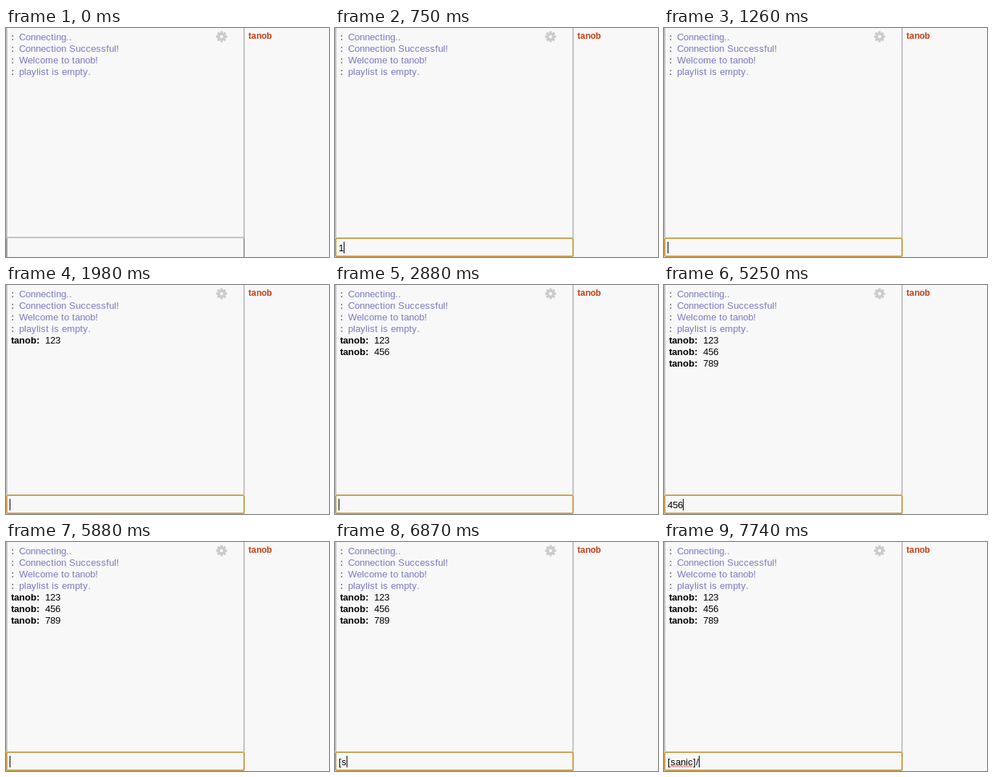
Write an HTML page with a canvas that moves like this. It is 445 px wide and 317 px high and loops after 8 s.

```html
<!DOCTYPE html>
<html lang="en">
<head>
<meta charset="utf-8">
<title>Chat input history</title>
<style>
  html, body { margin: 0; width: 100%; height: 100%; overflow: hidden; background: #f8f8f8; }
  canvas { display: block; }
</style>
</head>
<body>
<canvas id="stage" width="445" height="317"></canvas>
<script>
const ctx = document.getElementById('stage').getContext('2d');
const LOOP = 8000;
const BG = '#f8f8f8';
const USER = 'tanob';
const FACE = '"Liberation Sans", Arial, sans-serif';
const REGULAR = '13px ' + FACE;
const BOLD = 'bold 13px ' + FACE;
const LINE = 16;

const notices = ['Connecting..', 'Connection Successful!', `Welcome to ${USER}!`, 'playlist is empty.'];
const messages = [[1440, '123'], [2160, '456'], [3060, '789']];

const FOCUS_AT = 420;
const SQUIGGLE_AT = 7530;

// Contents of the input box from each moment on
const entries = [
  [0, ''],
  [750, '1'], [810, '12'], [870, '123'], [1260, ''],
  [1560, '4'], [1620, '45'], [1740, '456'], [1980, ''],
  [2220, '7'], [2400, '78'], [2610, '789'], [2880, ''],
  [4410, '789'], [4590, '456'], [4770, '123'],
  [5250, '456'], [5460, '789'], [5880, ''],
  [6690, '['], [6870, '[s'], [6930, '[sa'], [7050, '[san'],
  [7140, '[sani'], [7230, '[sanic'], [7410, '[sanic]'], [7740, '[sanic]/']
];
const caretOff = [[3600, 4080], [6360, 6690]];

// Draws text with whole-pixel advances and returns its right edge
function text(str, x, y, font, color) {
  ctx.font = font;
  ctx.fillStyle = color;
  for (const ch of str) {
    ctx.fillText(ch, x, y);
    x += Math.round(ctx.measureText(ch).width + 0.1);
  }
  return x;
}

function rect(x, y, w, h, color) {
  ctx.fillStyle = color;
  ctx.fillRect(x, y, w, h);
}

function disc(radius, color) {
  ctx.fillStyle = color;
  ctx.beginPath();
  ctx.arc(0, 0, radius, 0, Math.PI * 2);
  ctx.fill();
}

function gear(x, y) {
  ctx.save();
  ctx.translate(x, y);
  disc(5.8, '#cbcbcb');
  for (let i = 0; i < 8; i++) {
    rect(-1.6, -7.6, 3.2, 3, '#cbcbcb');
    ctx.rotate(Math.PI / 4);
  }
  disc(2.3, BG);
  ctx.restore();
}

function frame(focused) {
  rect(0, 0, 2, 290, '#c3c3c3');
  rect(327, 0, 2, 290, '#c3c3c3');
  if (focused) {
    ctx.strokeStyle = '#cba252';
    ctx.lineWidth = 2;
    ctx.beginPath();
    ctx.roundRect(1, 291, 327, 25, 1.5);
    ctx.stroke();
  } else {
    rect(0, 289, 329, 2, '#c3c3c3');
    rect(0, 291, 2, 26, '#a0a0a0');
    rect(327, 291, 2, 26, '#a0a0a0');
  }
}

function squiggle(from, to, y) {
  ctx.strokeStyle = '#f03030';
  ctx.lineWidth = 1;
  ctx.beginPath();
  for (let x = from; x <= to; x += 2) ctx.lineTo(x, y + ((x - from) % 4 ? -1 : 1));
  ctx.stroke();
}

function input(t) {
  const value = entries.filter(e => e[0] <= t).pop()[1];
  const end = text(value, 5, 309, REGULAR, '#000');
  if (t >= SQUIGGLE_AT) squiggle(9, 40, 310.5);
  if (!caretOff.some(([a, b]) => t >= a && t < b)) rect(end, 296, 1, 16, '#000');
}

function draw(t) {
  rect(0, 0, 445, 317, BG);
  frame(t >= FOCUS_AT);
  gear(297, 12);
  text(USER, 334, 15, 'bold 12px ' + FACE, '#c63f17');

  let y = 17;
  for (const line of notices) {
    text(':', 7, y, BOLD, '#777');
    text(line, 18, y, REGULAR, '#7a7ac4');
    y += LINE;
  }
  for (const [at, body] of messages) {
    if (t >= at) {
      text(USER + ':', 7, y, BOLD, '#000');
      text(body, 54, y, REGULAR, '#000');
    }
    y += LINE;
  }
  if (t >= FOCUS_AT) input(t);
}

const start = performance.now();
function tick() {
  draw((performance.now() - start) % LOOP);
  requestAnimationFrame(tick);
}
tick();
</script>
</body>
</html>
```
